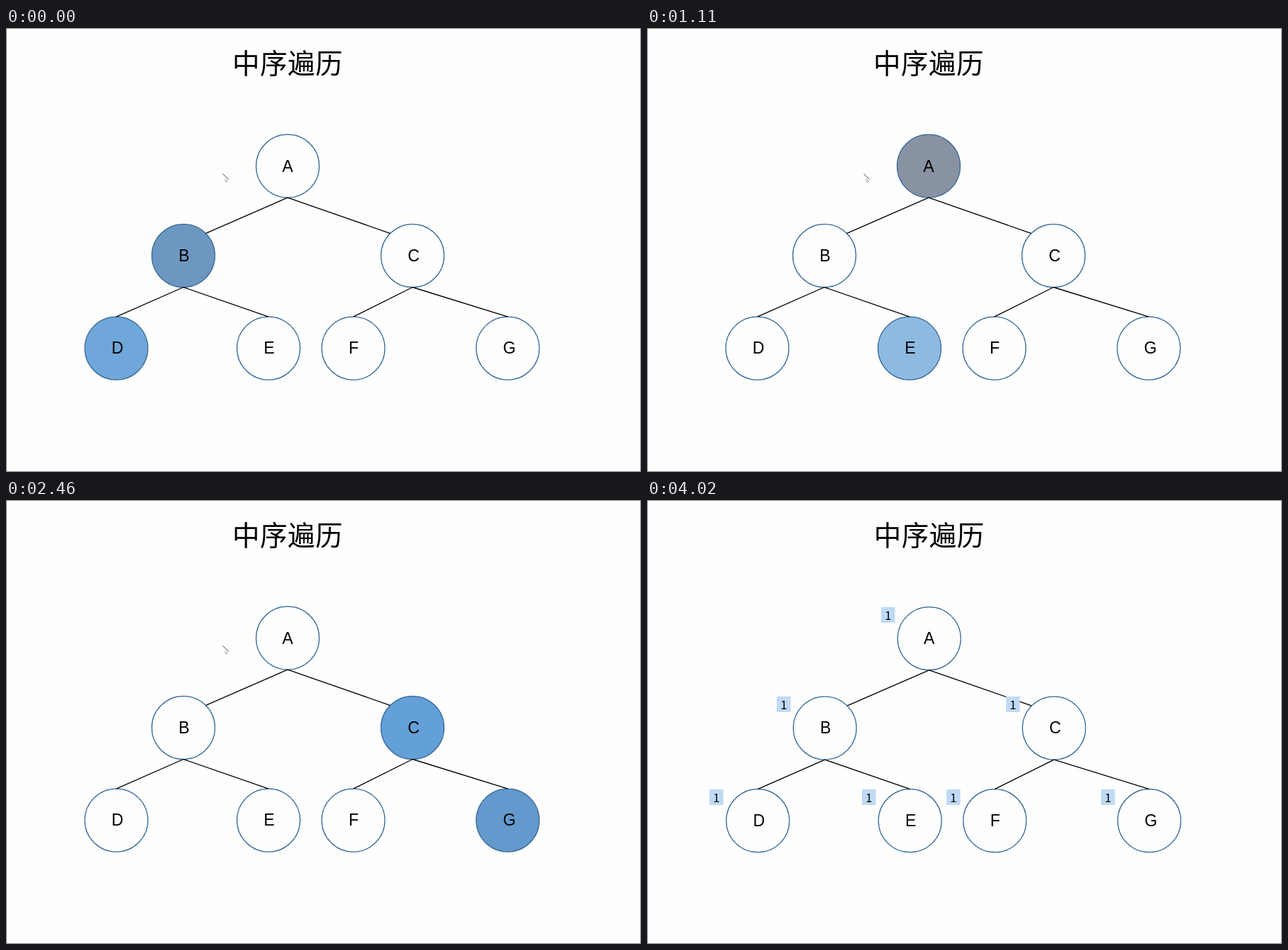
An HTML page for the animation above (4.14 s loop, 895 by 626 pixels).

```html
<!DOCTYPE html>
<html lang="zh">
<head>
<meta charset="utf-8">
<title>中序遍历</title>
<style>
  html, body { margin: 0; width: 100%; height: 100%; overflow: hidden; background: #fefefe; }
  svg { display: block; width: 895px; height: 626px; }
  text { text-anchor: middle; fill: #000; }
  .title { font: 500 38.5px "Noto Sans CJK SC", "Noto Sans CJK", sans-serif; letter-spacing: .5px; }
  .letter { font: 23px "Liberation Sans", Arial, sans-serif; }
  .tag rect { fill: #c0daf6; }
  .tag text { font: 16.5px "Noto Sans CJK SC", "Noto Sans CJK", sans-serif; }
  .node { stroke: #38699a; stroke-width: 1.25; }
  .edge { stroke: #000; stroke-width: 1.35; }
</style>
</head>
<body>
<svg viewBox="0 0 895 626" xmlns="http://www.w3.org/2000/svg">
  <rect x=".5" y=".5" width="894" height="625" fill="#fefefe" stroke="#808080"/>
  <g id="slide">
    <text class="title" x="397" y="63.7">中序遍历</text>
    <g id="nodes"></g>
    <g id="edges"></g>
  </g>
  <g id="tags"></g>
  <g id="cursor" fill="none" stroke="#444">
    <path d="M305.5 205.5l8 8"/>
    <path d="M308 214.5l1.5-1.5M309 217l2.5-3M311 217.5l1-1.5" stroke="#777"/>
  </g>
</svg>
<script>
const LOOP = 4140, TAGS_AT = 4020;
const STEP = 136, LEAD = 12, LAST_STEP = 24;
const BLUE = [91, 155, 213], ORANGE = [237, 125, 49], WHITE = [254, 254, 254];
const R = 44.5, LEVELS = [194.7, 321, 451.6];

// Level order: name, centre x, nudge of the letter
const tree = [
  ["A", 397, 0], ["B", 250, 1], ["C", 573, 1.5],
  ["D", 155.5, 1.5], ["E", 370, 1], ["F", 489.5, .5], ["G", 707.2, 2.3]
].map(([name, x, nudge], i) => {
  const level = Math.floor(Math.log2(i + 1));
  return { name, x, nudge, level, y: LEVELS[level] };
});

const get = id => document.getElementById(id);

function add(parent, name, attrs, label) {
  const el = document.createElementNS("http://www.w3.org/2000/svg", name);
  for (const key in attrs) el.setAttribute(key, attrs[key]);
  if (label) el.textContent = label;
  return parent.appendChild(el);
}

// Edges meet a leaf at its top and an inner node at its near shoulder.
function addEdge(from, to) {
  const angle = to.level === 2 ? 0 : Math.sign(from.x - to.x) * Math.PI / 4;
  add(get("edges"), "line", {
    class: "edge", x1: from.x, y1: from.y + R,
    x2: to.x + R * Math.sin(angle), y2: to.y - R * Math.cos(angle)
  });
}

tree.forEach((node, i) => {
  const { name, x, y, nudge } = node;
  node.circle = add(get("nodes"), "circle", { class: "node", cx: x, cy: y, r: R });
  add(get("nodes"), "text", { class: "letter", x: x + nudge, y: y + 7.8 }, name);
  if (i) addEdge(tree[(i - 1) >> 1], node);

  const place = `translate(${Math.floor(x - 67)} ${Math.round(y - 43.6)})`;
  const tag = add(get("tags"), "g", { class: "tag", transform: place });
  add(tag, "rect", { width: 19.5, height: 22 });
  add(tag, "text", { x: 9.8, y: 17.5 }, "1");
});

function inOrder(i) {
  return i < tree.length ? [...inOrder(2 * i + 1), tree[i], ...inOrder(2 * i + 2)] : [];
}
const visits = inOrder(0);

const mix = (a, b, q) => `rgb(${a.map((v, i) => Math.round(v + (b[i] - v) * q))})`;

// A node warms to orange, snaps back to blue, then fades out.
function fillAt(age) {
  if (age >= -1 && age < 0) return mix(BLUE, ORANGE, age + 1);
  if (age >= 0 && age < 1) return mix(BLUE, WHITE, age);
  return mix(WHITE, WHITE, 0);
}

function draw(t) {
  const step = Math.floor((t + LEAD) / STEP);
  const resting = step >= LAST_STEP, tagged = t >= TAGS_AT;
  const phase = resting ? visits.length : .12 + .274 * step;
  visits.forEach((node, i) => node.circle.setAttribute("fill", fillAt(phase - i)));

  get("tags").setAttribute("visibility", tagged ? "visible" : "hidden");
  get("cursor").setAttribute("visibility", tagged ? "hidden" : "visible");
  get("cursor").setAttribute("transform", resting ? "translate(-81 -17)" : "");
  get("slide").setAttribute("transform", tagged ? "translate(.7 .6)" : "");
}

const start = performance.now();
function tick() {
  draw((performance.now() - start) % LOOP);
  requestAnimationFrame(tick);
}
tick();
</script>
</body>
</html>
```
